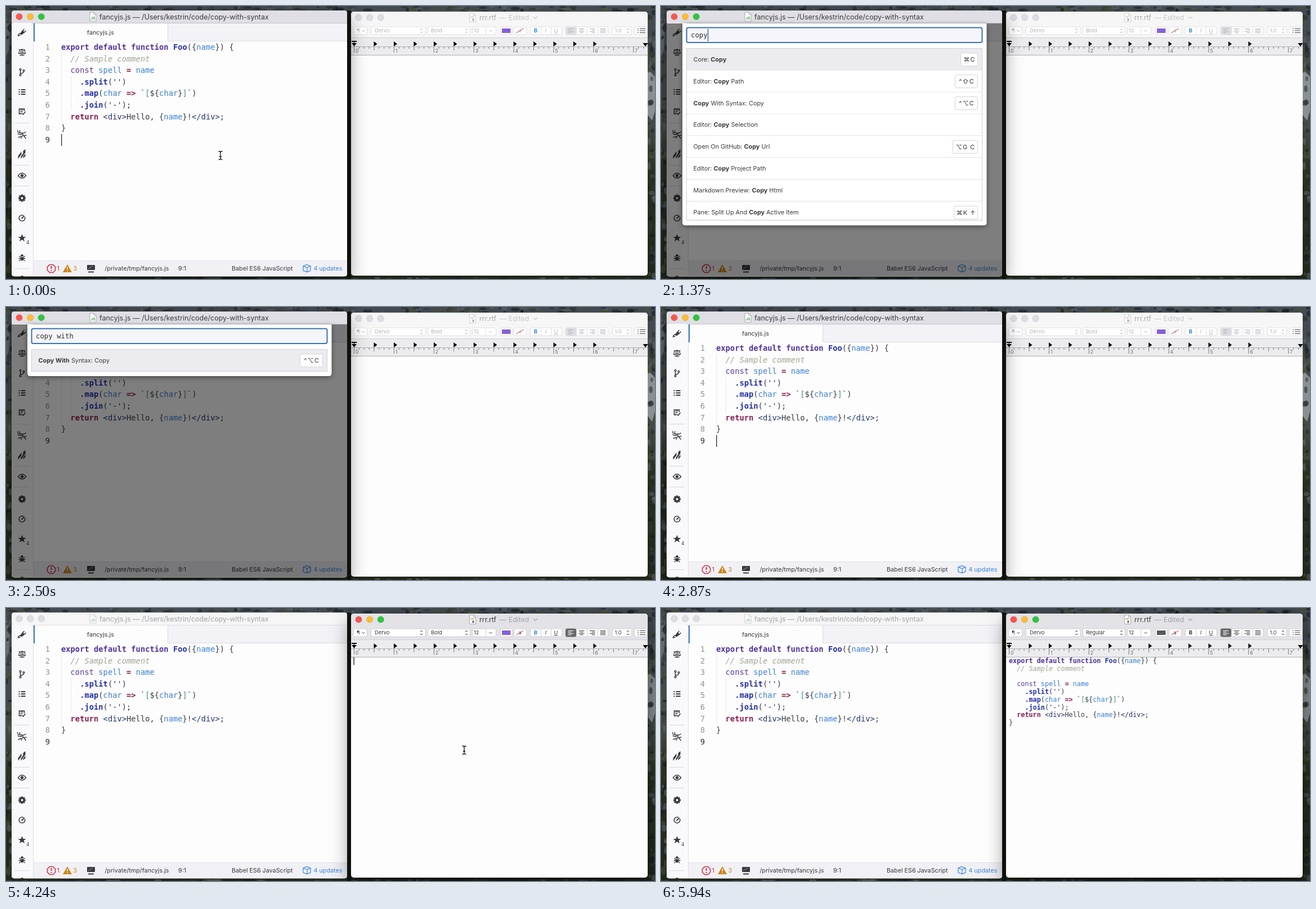
An HTML page that plays this animation: 1153 by 486 pixels, repeating every 5.97 s.

```html
<!DOCTYPE html>
<html lang="en">
<head>
<meta charset="utf-8">
<title>Copy with syntax</title>
<style>
  html, body { margin: 0; width: 100%; height: 100%; overflow: hidden; background: #12160f; }
  svg { display: block; position: absolute; left: 0; top: 0; }
  text { font-family: Inter, sans-serif; }
  .mono, .mono tspan { font-family: "DejaVu Sans Mono", monospace; }
  .key { font-family: Inter, "DejaVu Sans", sans-serif; letter-spacing: 1px; }
  .K { fill: #50309c; font-weight: bold; }
  .C { fill: #5c3a96; }
  .F { fill: #2430a4; font-weight: bold; }
  .V { fill: #3a7fd4; }
  .R { fill: #8c1c50; font-weight: bold; }
  .S { fill: #25356f; }
  .G { fill: #459078; }
  .N { fill: #a3a493; font-style: italic; }
  .T { fill: #3a3a44; }
  .panel { filter: drop-shadow(0 2px 4px rgba(0, 0, 0, .45)); }
  .raised { filter: drop-shadow(0 14px 17px rgba(0, 0, 0, .5)); }
</style>
</head>
<body>
<svg width="1153" height="486" viewBox="0 0 1153 486">
  <defs>
    <linearGradient id="valley" x2="0" y2="1">
      <stop offset="0" stop-color="#434a52"/>
      <stop offset=".45" stop-color="#454a42"/>
      <stop offset=".6" stop-color="#2a3020"/>
      <stop offset="1" stop-color="#20261a"/>
    </linearGradient>
  </defs>
  <g id="back"></g>
  <g id="scene"></g>
  <g id="mouse"></g>
</svg>
<script>
const LOOP = 5970, OPEN = 200, RUN = 2750, MOVE = 3080, CLICK = 4000, PASTE = 5000;
const query = "copy with", keys = [700, 800, 920, 1020, 1600, 1700, 1800, 1920, 2050];

const code = [
  "K|export default function |F|Foo|T|({|V|name|T|}) {",
  "N|  // Sample comment",
  "C|  const |V|spell |R|= |V|name",
  "F|    .split|T|(|S|''|T|)",
  "F|    .map|T|(|V|char |R|=> |S|`|G|[|T|${|V|char|T|}|G|]|S|`|T|)",
  "F|    .join|T|(|S|'-'|T|);",
  "R|  return |S|<div>|T|Hello, {|V|name|T|}!|S|</div>|T|;",
  "T|}"
];
const allItems = [
  ["About: View Release Notes"], ["Application: About"],
  ["Application: Add Project Folder", "⇧⌘O", 43],
  ["Application: Bring All Windows To Front"],
  ["Application: Hide", "⌘H", 30],
  ["Application: Hide Other Applications", "⌥⌘H", 42],
  ["Application: Install Update"], ["Application: Minimize", "⌘M", 32]
];
const copyItems = [
  ["Core: Copy", "⌘C", 30], ["Editor: Copy Path", "^⇧C", 40],
  ["Copy With Syntax: Copy", "^⌥C", 40], ["Editor: Copy Selection"],
  ["Open On GitHub: Copy Url", "⌥G C", 44], ["Editor: Copy Project Path"],
  ["Markdown Preview: Copy Html"], ["Pane: Split Up And Copy Active Item", "⌘K ↑", 42]
];

// Drawing helpers; text is placed by its vertical centre.
const esc = s => s.replace(/&/g, "&amp;").replace(/</g, "&lt;").replace(/ /g, "\u00a0");
const raw = (x, y, s, size, fill, more = "") =>
  `<text x="${x}" y="${y + size * .36}" font-size="${size}" fill="${fill}" ${more}>${s}</text>`;
const text = (x, y, s, size, fill, more) => raw(x, y, esc(s), size, fill, more);
const rect = (x, y, w, h, fill, more = "") =>
  `<rect x="${x}" y="${y}" width="${w}" height="${h}" fill="${fill}" ${more}/>`;
const disc = (x, y, r, fill, more = "") => `<circle cx="${x}" cy="${y}" r="${r}" fill="${fill}" ${more}/>`;
const line = (d, color = "#3a3a3e", w = 1.5, more = "") =>
  `<path d="${d}" fill="none" stroke="${color}" stroke-width="${w}" ${more}/>`;
const fill = (d, color = "#3a3a3e") => `<path d="${d}" fill="${color}"/>`;
const at = (x, y, s) => `<g transform="translate(${x} ${y})">${s}</g>`;
const middle = 'text-anchor="middle"';
const range = (n, f) => Array.from({ length: n }, (_, i) => f(i)).join("");

function codeLine(x, y, s, size) {
  const p = s.split("|");
  let out = "";
  for (let i = 0; i < p.length; i += 2) out += `<tspan class="${p[i]}">${esc(p[i + 1])}</tspan>`;
  return raw(x, y, out, size, "#333", 'class="mono"');
}

const lights = (x, y, on) => ["#f9564f", "#fdbc2f", "#30c53f"]
  .map((c, i) => disc(x + i * 19.6, y, 5.8, on ? c : "#dddde4", `stroke="${on ? "#0002" : "#c9c9d2"}" stroke-width=".7"`)).join("");

const page = (x, y, label, on) => `<g opacity="${on ? 1 : .5}">` +
  `<path d="M${x} ${y}h7l4 4v12h-11z" fill="#fff" stroke="#999" stroke-width=".8"/>` +
  line(`M${x + 7} ${y}v4h4`, "#999", .8) +
  (label ? text(x + 5.5, y + 10.5, label, 6.5, "#4a9a50", middle + ' font-weight="bold"')
         : line(`M${x + 2} ${y + 6}h6M${x + 2} ${y + 8}h5`, "#c79a60", 1) + rect(x + 5, y + 10, 3, 4, "#666")) + "</g>";

function backdrop() {
  let seed = 7;
  const rnd = () => (seed = seed * 16807 % 2147483647) / 2147483647;
  const tones = ["#14181a", "#262c22", "#343a34", "#5c6468", "#4a5038"];
  const patch = (x, y, w, h) =>
    `<ellipse cx="${x}" cy="${y}" rx="${w}" ry="${h}" fill="${tones[rnd() * 5 | 0]}" opacity=".55"/>`;
  return rect(0, 0, 1153, 486, "url(#valley)") +
    fill("M1140 112l13 14v60l-5 18-8-10z", "#8a9092") + fill("M0 20l7 18-2 40-5 12z", "#656a70") +
    range(140, () => patch(rnd() * 1153, rnd() * 9, 2 + rnd() * 7, 1 + rnd() * 3)) +
    range(60, () => patch(rnd() * 10, rnd() * 486, 1 + rnd() * 4, 2 + rnd() * 6)) +
    range(60, () => patch(1140 + rnd() * 13, rnd() * 486, 1 + rnd() * 5, 2 + rnd() * 6)) +
    range(80, () => patch(rnd() * 1153, 484 + rnd() * 3, 3 + rnd() * 8, 1 + rnd() * 2)) +
    rect(606, 8, 7, 478, "#12160f");
}

function sidebar() {
  const dark = "#3a3a3e";
  const icon = (y, s) => at(28.5, y, s);
  const teeth = range(8, i => `<rect x="-1.6" y="-6.5" width="3.2" height="4" fill="${dark}" transform="rotate(${i * 45})"/>`);
  return rect(10, 30, 38, 451, "#f9f9fb", 'rx="4"') + rect(48, 30, 1, 451, "#e0e0e6") +
    [208, 283, 320, 467].map(y => line(`M15 ${y + .5}h27`, "#c9c9d2", 1, 'stroke-dasharray="2 1"')).join("") +
    icon(47, fill("M-3 1l4-5 4 4-5 4q-3 1-3-3z") + line("M1-3l3-3M4 0l3-3M-2 2q-5 0-5 4l4-1")) +
    icon(82, line("M0-6v11M-4 5.5h8M-6-4h12") + line("M-4-3l-2.5 5h5zM4-3l-2.5 5h5z", dark, 1) + fill("M-7 2h6q-3 3-6 0M1 2h6q-3 3-6 0")) +
    icon(118, line("M-3-3v7M-3 2q6 0 6-4") + [[-3, -5], [-3, 5], [3, -3]].map(p => disc(...p, 1.5, "#f9f9fb", `stroke="${dark}" stroke-width="1.3"`)).join("")) +
    icon(153, line("M-6-4h2M-6 0h2M-6 4h2M-2-4h8M-2 0h8M-2 4h8", dark, 1.8)) +
    icon(188, line("M4-1v-4h-9v9h4M-3-3h5M-3 0h4M-3 3h2", dark, 1.6) + line("M0 3l2 2 4-5", dark, 1.6)) +
    icon(228, line("M-8-7q0 5 5 5h3q4 1 7-2M-4-7v4M-8-1q4 3 8 1M0-2l3 5 5-1M3 3l4 5M2 1l-4 7M-1 4l-6 2", dark, 1.4)) +
    icon(264, fill("M-7 3l6-8v5l-6 8zM-2 4l4-6v-4l4-3v6l-8 11zM2 4l4-5v4l-4 4z")) +
    icon(302, line("M-7 0q7-9 14 0q-7 9-14 0z", dark, 1.5) + disc(0, 0, 2.7, dark)) +
    icon(342, teeth + disc(0, 0, 3.5, "none", `stroke="${dark}" stroke-width="3"`)) +
    icon(377.5, disc(0, 0, 5.3, "none", `stroke="${dark}" stroke-width="1.6"`) + line("M0 1l5-6", "#f9f9fb", 3) + line("M-1 1l5-5", dark, 1.8)) +
    icon(413, fill("M0-7l2 5h5l-4 3 1.6 5-4.6-3-4.6 3 1.6-5-4-3h5z")) + text(36, 421, "4", 8.5, dark) +
    icon(448, line("M-5-3l2 2M5-3l-2 2M-6 1.5h12M-5 6l2-2M5 6l-2-2", dark, 1.3) + fill("M-3-1h6v4q-3 5-6 0zM-2.5-2q0-4 2.5-4t2.5 4z")) +
    fill("M25 482q3.5-4 7 0z");
}

function statusBar() {
  const t = (x, s, c) => text(x, 467.5, s, 10.75, c);
  return `<path d="M49 453h557v24q0 4-4 4h-553z" fill="#f0f0f5"/>` + rect(49, 453, 557, 1, "#e3e3ea") +
    line("M77.5 460.5h6l4 4v6l-4 4h-6l-4-4v-6z", "#cc3040", 1.6) + line("M80.5 463v5M80.5 470v2", "#cc3040", 2) + t(90.5, "1", "#cc3040") +
    fill("M109 460l8 14h-16z", "#cc8418") + line("M109 464v5M109 470.5v1.8", "#f6f0e4", 1.6) + t(119.5, "3", "#cc8418") +
    rect(144, 461, 14, 9, "#3a3a3e", 'rx="1"') + line("M146 473.5h10", "#3a3a3e", 2) + line("M146 468l8-5", "#999", 1) +
    t(175.5, "/private/tmp/fancyjs.js", "#38383e") + t(306, "9:1", "#38383e") +
    t(401, "Babel ES6 JavaScript", "#38383e") + t(546.5, "4 updates", "#3a86d8") +
    line("M528 463l6-2.5 7 2.5v8l-6 2.5-7-2.5zM528 463l7 2.5 6-2.5M535 465.5v8", "#3a86d8", 1.2);
}

const frameRect = (x, y, w, h, on) => rect(x, y, w, h, "#fdfdfd", `rx="5" ${on ? 'class="raised"' : ""}`);

function leftWindow(s) {
  const on = s.focus === "left";
  let out = frameRect(10, 8, 596, 473.5, on) +
    `<path d="M10 30v-17q0-5 5-5h586q5 0 5 5v17z" fill="${on ? "#e0dfe5" : "#f6f6f7"}"/>` +
    rect(10, 30, 596, 1, on ? "#c2c2c8" : "#dedee2") + lights(23.5, 19, on) + page(149, 11, "JS", on) +
    text(166, 19.5, "fancyjs.js — /Users/kestrin/code/copy-with-syntax", 12.5, on ? "#3a3a3e" : "#a5a5aa") +
    sidebar() + rect(288, 31, 318, 31, "#f2f2f7") + rect(287, 31, 1, 31, "#dcdce4") + rect(288, 62, 318, 1, "#dcdce4") +
    rect(49, 31, 2, 32, "#3878b8") + text(168, 47.5, "fancyjs.js", 10.75, "#333", middle) +
    rect(98, 83, 1, 124, "#e9e9ec") + rect(115, 125, 1, 61, "#e9e9ec") +
    range(9, i => text(78, 73 + i * 20.6, "" + (i + 1), 13.78, i < 8 ? "#93939a" : "#333", 'class="mono" text-anchor="end"')) +
    code.map((c, i) => codeLine(98, 73 + i * 20.6, c, 13.78)).join("") + statusBar();
  if (s.open) out += `<path d="M10 31h596v446q0 4-4 4h-588q-4 0-4-4z" opacity=".5"/>` + palette(s);
  else if (on && s.caret) out += rect(98, 228, 1.4, 21, "#333");
  return out;
}

function palette({ typed, caret }) {
  const items = typed.length > 5 ? [copyItems[2]] : typed ? copyItems : allItems;
  const one = items.length === 1, q = typed.trim(), bottom = one ? 123 : 390.5;
  const row = ([label, key, w], i) => {
    const y = 75.5 + i * 38.9, cy = y + 19.3, h = i === 7 ? 33.5 : 38.9;
    const k = q ? label.toLowerCase().indexOf(q) : -1, end = k + q.length;
    const s = k < 0 ? esc(label)
      : esc(label.slice(0, k)) + `<tspan font-weight="700">${esc(label.slice(k, end))}</tspan>` + esc(label.slice(end));
    return rect(45.5, y, 525, h, i ? "#fff" : "#ececf0") + rect(45.5, y + h - .5, 525, 1, "#c9c9cd") +
      raw(57.5, cy, s, 10.85, "#38383e") +
      (key ? rect(562.5 - w, cy - 11, w, 23, "#fff", 'rx="2.5" stroke="#d3d3dc"') +
        text(563 - w / 2, cy + .7, key, 11, "#333", `class="key" ${middle}`) : "");
  };
  return `<path class="panel" d="M38 31h540.5v${bottom - 36}q0 5-5 5h-530.5q-5 0-5-5z" fill="#fff"/>` +
    rect(45.5, 38.5, 525, 26.5, "#f5f5fa", 'rx="3" stroke="#3a72b4" stroke-width="2"') +
    text(53, 52, typed, 12.35, "#333", 'class="mono"') +
    (caret ? rect(53 + typed.length * 7.44, 41, 1.5, 22, "#3a72b4") : "") +
    items.map(row).join("") + rect(45.5, 75.5, 525, one ? 39 : 306, "none", 'stroke="#cfcfd6"');
}

function toolbar(on, bold) {
  const ink = on ? "#38383c" : "#b4b4bc", edge = on ? "#cfcfd6" : "#e0e0e5";
  const box = (x, w) => rect(x + .5, 37, w, 14, "#fff", `rx="3" stroke="${edge}"`);
  const t = (x, s, more) => text(x, 44, s, 9.3, ink, more);
  const steps = x => line(`M${x - 2} 42.5l2-2.5 2 2.5M${x - 2} 45.5l2 2.5 2-2.5`, ink, 1);
  const down = x => line(`M${x - 2.5} 43l2.5 2.5 2.5-2.5`, ink, 1);
  const blue = bold ? "#2a86e8" : ink;
  return box(617, 24) + t(623, "¶") + down(635) +
    box(648, 97) + t(655, "Dervo") + steps(738) + box(749, 75) + t(755, bold ? "Bold" : "Regular") + steps(818) +
    box(828, 42) + t(831, "12") + rect(852, 37, 1, 14, edge) + down(861) +
    box(878, 21) + rect(881, 40, 15.5, 8, bold ? "#8560d8" : "#58585c") +
    box(902, 22) + text(913, 44, "a", 9, ink, middle) + line("M906 48l14-8", "#c84848", 1) +
    box(931, 56) + rect(950, 37, 1, 14, edge) + rect(968, 37, 1, 14, edge) +
    text(941, 44, "B", 9.5, blue, middle + ' font-weight="bold"') + t(959, "I", middle + ' font-style="italic"') +
    t(977, "U", middle + ' text-decoration="underline"') +
    box(994, 75) + rect(994, 36.5, 19, 15, on ? "#68686c" : "#dedee2", 'rx="3"') +
    range(4, i => (i ? rect(994 + i * 19, 37, 1, 14, edge) : "") +
      range(4, j => {
        const w = j % 2 && i < 3 ? 6 : 10, x = 998.5 + i * 19 + (10 - w) * [0, .5, 1, 0][i];
        return rect(x, 40 + j * 2.4, w, 1, on && !i ? "#fff" : ink);
      })) +
    box(1077, 34) + t(1081.5, "1.0") + steps(1105) + box(1116, 22) +
    line("M1122 40.5h2M1122 44h2M1122 47.5h2M1126 40.5h10M1126 44h10M1126 47.5h10", "#3a3a3e", 1.2);
}

function ruler() {
  const inch = 70.9;
  return rect(613, 56.5, 527, 30.5, "#ececee") + rect(613, 56, 527, 1, "#d0d0d4") + rect(613, 87, 527, 1, "#b0b0b4") +
    rect(613, 72, 527, .8, "#a0a0a4") +
    range(59, i => rect(618 + i * inch / 8, 73, 1, i % 8 ? i % 4 ? 3 : 6 : 10, "#77777b")) +
    range(8, i => text(621 + i * inch, 80, "" + i, 8.5, "#66666a")) +
    range(12, i => fill(`M${653.5 + i * inch / 2} 63l6 4.5-6 4.5z`, "#000")) +
    fill("M614 62h9v2h-9zM614 66h9l-4.5 5.5z", "#000") + rect(618, 63, 1, 9, "#000") + fill("M1131.5 66h9l-4.5 6z", "#000");
}

function rightWindow(s) {
  const on = s.focus === "right", faint = on ? "#a2a2a8" : "#c8c8cc";
  let out = frameRect(613, 10, 527, 470, on) +
    `<path d="M613 56.5v-41q0-5 5-5h517q5 0 5 5v41z" fill="${on ? "#e3e2e7" : "#f6f6f7"}"/>` +
    lights(626.5, 20.5, on) + page(823.5, 12.5, "", on) +
    text(841, 20.5, "rrr.rtf", 12.3, on ? "#3a3a3e" : "#a9a9ae") +
    text(877, 20.5, "— Edited", 12.3, faint) + line("M937 19l3.5 3.5 3.5-3.5", faint, 1.2) +
    toolbar(on, !s.pasted) + ruler();
  if (s.pasted) out += code.map((c, i) => codeLine(618, 94 + (i + (i > 1)) * 13.75, c, 11.8)).join("");
  if (on && s.caret) out += rect(617.5, s.pasted ? 211 : 87.5, 1.2, 14, "#000");
  return out;
}

function stateAt(t) {
  const n = keys.filter(k => k <= t).length;
  const open = t >= OPEN && t < RUN, right = t >= CLICK, pasted = t >= PASTE;
  const since = pasted ? PASTE : right ? CLICK : t >= RUN ? RUN : n ? keys[n - 1] : open ? OPEN : 0;
  return {
    open, pasted, focus: right ? "right" : "left", typed: query.slice(0, n),
    caret: Math.floor((t - since) / (right ? 500 : 400)) % 2 === 0
  };
}

function mouseAt(t) {
  if (t >= keys[0] && t < MOVE || t >= PASTE) return "";
  const u = Math.min(1, Math.max(0, (t - MOVE) / 820)), e = u * u * (3 - 2 * u);
  const x = 381 + 433 * e, y = 266 - 13 * e;
  const arrow = t >= OPEN && t < RUN || x > 600 && x < 616;
  return at(x, y, arrow
    ? `<path d="M-1-3v15l3.5-3 2.5 6 2.5-1-2.5-6h5z" fill="#000" stroke="#fff"/>`
    : line("M-3.5-7.5q3.5 0 3.5 2.5q0-2.5 3.5-2.5M0-5v10M-3.5 7.5q3.5 0 3.5-2.5q0 2.5 3.5 2.5M-2 2h4", "#111", 1.3));
}

const [back, scene, mouse] = ["back", "scene", "mouse"].map(id => document.getElementById(id));
back.innerHTML = backdrop();
let shown = "", start;
function frame(now) {
  start ??= now;
  const t = (now - start) % LOOP, s = stateAt(t), key = JSON.stringify(s);
  if (key !== shown) {
    // The focused window lies on top and casts its shadow on the other.
    const left = leftWindow(s), right = rightWindow(s);
    scene.innerHTML = s.focus === "left" ? right + left : left + right;
    shown = key;
  }
  mouse.innerHTML = mouseAt(t);
  requestAnimationFrame(frame);
}
requestAnimationFrame(frame);
</script>
</body>
</html>
```
